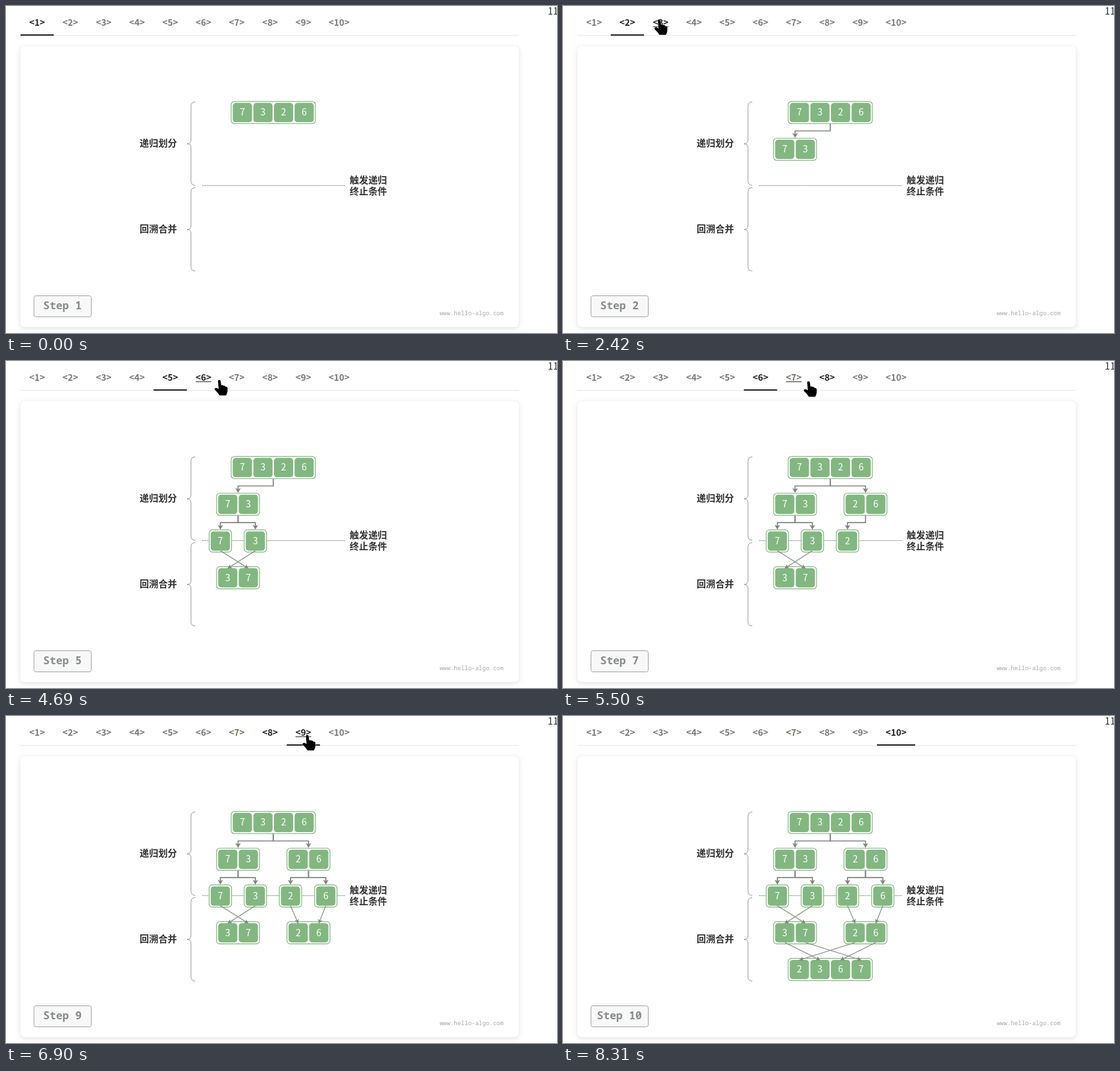
An HTML page for the animation above (9.11 s loop, 837x496 px).

```html
<!DOCTYPE html>
<html lang="zh-CN">
<head>
<meta charset="utf-8">
<title>归并排序</title>
<style>
  html, body { margin: 0; width: 100%; height: 100%; overflow: hidden; background: #fff; }
  svg { display: block; width: 837px; height: 496px; }
  text { font-family: "Noto Sans CJK SC", "Noto Sans CJK", "Noto Sans", sans-serif; }
  .card { fill: #fff; filter: drop-shadow(0 2px 4px rgba(0,0,0,.1)) drop-shadow(0 0 .6px rgba(0,0,0,.22)); }
  .tab { font-size: 13.5px; font-weight: 700; fill: #787878; text-anchor: middle; }
  .tab.olive { fill: #77745c; }
  .tab.dark { fill: #222; }
  .label { font-size: 14.2px; font-weight: 700; fill: #333; }
  .brace { fill: none; stroke: #999; }
  .dots { stroke: #666; stroke-dasharray: 1.2 1.2; }
  .box { fill: #fff; stroke: #83b781; stroke-width: 1.2; }
  .cell { fill: #83b781; }
  .num { font-size: 14px; fill: #fff; text-anchor: middle; }
  .elbow { fill: none; stroke: #838683; stroke-width: 1.7; }
  .merge { stroke: #7d8c7d; stroke-width: 1.1; }
  .head { fill: #7f857f; }
  .mono { font-family: "Noto Sans Mono", "DejaVu Sans Mono", monospace; }
  .step { font-size: 16.3px; font-weight: 700; fill: #868c88; text-anchor: middle; }
  .site { font-size: 9px; fill: #aaa; }
  .pointer { fill: #000; stroke: #fff; stroke-width: .8; paint-order: stroke; }
  .click { fill: #fff75c; mix-blend-mode: multiply; }
</style>
</head>
<body>
<svg id="stage" viewBox="0 0 837 496"></svg>
<script>
const LOOP = 9110, START = 140, TICK = 66.96, EXIT = 8305;
const stage = document.getElementById('stage');

function add(parent, tag, attrs, text) {
  const el = document.createElementNS('http://www.w3.org/2000/svg', tag);
  for (const key in attrs) el.setAttribute(key, attrs[key]);
  if (text) el.textContent = text;
  parent.append(el);
  return el;
}
const show = (el, on) => { el.style.display = on ? '' : 'none'; };
const clamp = v => Math.max(0, Math.min(1, v));

// Tabs
const TAB_W = 50.55, LAST_W = 58;
const tabLeft = i => 22 + TAB_W * i;
const tabWidth = i => i === 9 ? LAST_W : TAB_W;
add(stage, 'path', { d: 'M22 44.5H779', stroke: '#e9e9e9' });
const tabs = [...Array(10).keys()].map(i => add(stage, 'text', {
  class: 'tab', x: tabLeft(i) + tabWidth(i) / 2, y: 29.6
}, `<${i + 1}>`));
const underline = add(stage, 'rect', { y: 31, height: 1, fill: '#333' });
const bar = add(stage, 'rect', { y: 43, height: 2, fill: '#222' });
add(stage, 'text', { x: 823, y: 13, 'font-size': 14.5, fill: '#333' }, '11');

// Card
add(stage, 'rect', { class: 'card', x: 22, y: 61, width: 757, height: 426, rx: 5 });
for (const y of [145.5, 275.5]) {
  add(stage, 'path', { class: 'brace', d: `M287.5 ${y}q-6.5 0-6.5 6.5v51q0 6-6 6q6 0 6 6v50.5q0 6.5 6.5 6.5` });
}
for (const [x, y, text] of [
  [203, 212.5, '递归划分'], [203, 342.5, '回溯合并'],
  [522, 269.3, '触发递归'], [522, 286.3, '终止条件']
]) add(stage, 'text', { class: 'label', x, y }, text);
add(stage, 'path', { class: 'dots', d: 'M298 272.5H515' });
add(stage, 'rect', { x: 42.5, y: 439.5, width: 87, height: 32, rx: 3, fill: '#f8f8f8', stroke: '#a3a7a4' });
const stepText = add(stage, 'text', { class: 'mono step', x: 85.7, y: 460 });
add(stage, 'text', { class: 'mono site', x: 658.7, y: 469 }, 'www.hello-algo.com');

// Diagram: each step adds one layer
const PITCH = 31.3, ROW = 55.7, TOP = 144.8;
const rowY = r => TOP + ROW * r;
const cellX = (cx, n, i) => cx + (i - (n - 1) / 2) * PITCH;
const lines = add(stage, 'g'), boxes = add(stage, 'g'), merges = add(stage, 'g');
const layers = [...Array(10)].map(() => [lines, boxes, merges].map(g => add(g, 'g')));

function group(step, cx, row, digits) {
  const g = layers[step - 1][1], n = digits.length, y = rowY(row);
  const w = 34 + PITCH * (n - 1);
  add(g, 'rect', { class: 'box', x: cx - w / 2, y, width: w, height: 33.7, rx: 5 });
  [...digits].forEach((d, i) => {
    const x = cellX(cx, n, i);
    add(g, 'rect', { class: 'cell', x: x - 14.6, y: y + 2.3, width: 29.2, height: 29.2, rx: 4.5 });
    add(g, 'text', { class: 'num', x, y: y + 21.6 }, d);
  });
}
function head(g, x, y, angle, size) {
  add(g, 'path', {
    class: 'head', d: `M0 0L${-size * 1.7} ${-size}L${-size * 1.3} 0L${-size * 1.7} ${size}Z`,
    transform: `translate(${x} ${y}) rotate(${angle})`
  });
}
function elbow(step, from, to, row) {
  const g = layers[step - 1][0], y = rowY(row);
  add(g, 'path', { class: 'elbow', d: `M${from} ${y + 34}V${y + 44.7}H${to}V${y + 51}` });
  head(g, to, y + 55.2, 90, 4.2);
}
function merge(step, x1, x2, row) {
  const g = layers[step - 1][2], y1 = rowY(row) + 31.5, y2 = rowY(row + 1) + 2.6;
  add(g, 'line', { class: 'merge', x1, y1, x2, y2 });
  head(g, x2, y2, Math.atan2(y2 - y1, x2 - x1) * 180 / Math.PI, 3.6);
}

const MID = 406, L = 352.5, R = 459.5, LEAVES = [325.6, 378.8, 432.2, 485.8];
group(1, MID, 0, '7326');
group(2, L, 1, '73');  elbow(2, MID, L, 0);
group(6, R, 1, '26');  elbow(6, MID, R, 0);
[[3, L, '7'], [4, L, '3'], [7, R, '2'], [8, R, '6']].forEach(([step, parent, digit], i) => {
  group(step, LEAVES[i], 2, digit);
  elbow(step, parent, LEAVES[i], 1);
});
group(5, L, 3, '37');
merge(5, LEAVES[0], cellX(L, 2, 1), 2);
merge(5, LEAVES[1], cellX(L, 2, 0), 2);
group(9, R, 3, '26');
merge(9, LEAVES[2], cellX(R, 2, 0), 2);
merge(9, LEAVES[3], cellX(R, 2, 1), 2);
group(10, MID, 4, '2367');
[[L, 0, 1], [L, 1, 3], [R, 0, 0], [R, 1, 2]].forEach(([cx, i, to]) =>
  merge(10, cellX(cx, 2, i), cellX(MID, 4, to), 3));

// Pointer
const click = add(stage, 'circle', { class: 'click', r: 12.3 });
const hand = add(stage, 'path', {
  class: 'pointer',
  d: 'M-2 1Q0-1.5 2 1L3 8Q5 6.8 6.5 8.5Q8.5 7.8 9.5 10Q12.3 9.6 12.5 12V17Q12 20 10.3 23.3H.5Q-2 19-7 14.5Q-7.5 11.3-4 11.8L-1 13.5Z'
});
const arrow = add(stage, 'path', { class: 'pointer', d: 'M0 0V15L3.6 11.8L6 17.3L8.4 16.2L6 10.9H10.8Z' });

// time, x, y of the pointer tip
const PATH = [
  [140, 782, 480], [207, 618, 415], [274, 402, 278], [341, 250, 221], [408, 123, 177],
  [475, 68, 131], [542, 53, 101], [609, 59, 79], [800, 80, 38], [1010, 91, 17],
  [1350, 91, 16], [1560, 92, 17], [1950, 143, 20], [2080, 146, 20], [2700, 146, 21],
  [3240, 205, 26], [3500, 206, 26], [3900, 255, 28], [4200, 257, 29], [4550, 318, 29],
  [4690, 324, 29], [4860, 324, 30], [5250, 366, 31], [5500, 373, 31], [5850, 404, 30],
  [6150, 406, 30], [6480, 454, 29], [6900, 457, 29], [7100, 494, 23], [7440, 506, 28],
  [7780, 506, 28], [7850, 480, 68], [8040, 551, 166], [8220, 551, 166], [8235, 609, 182]
];
const CLICKS = [1420, 2440, 3340, 4050, 4750, 5360, 5980, 6580, 7630];

function pointerAt(t) {
  const i = PATH.findIndex(p => p[0] > t);
  if (i < 0) return PATH[PATH.length - 1].slice(1);
  if (i === 0) return PATH[0].slice(1);
  const [t0, x0, y0] = PATH[i - 1], [t1, x1, y1] = PATH[i];
  const k = (t - t0) / (t1 - t0);
  return [x0 + (x1 - x0) * k, y0 + (y1 - y0) * k];
}
const passed = (t, delay) => CLICKS.filter(c => t >= c + delay).length;

function draw(now) {
  const t = now < START ? 0 : START + Math.floor((now - START + 5) / TICK) * TICK;
  const [x, y] = pointerAt(t);
  const visible = now >= START && now < EXIT;
  const hover = visible && y < 46 ? tabs.findIndex((_, i) => x >= tabLeft(i) && x < tabLeft(i) + tabWidth(i)) : -1;

  const step = passed(t, 90) + 1;
  stepText.textContent = 'Step ' + step;
  layers.forEach((parts, i) => parts.forEach(g => show(g, i < step)));

  const active = passed(t, 150);
  const prev = Math.max(0, active - 1);
  const p = active ? clamp((t - CLICKS[active - 1] - 150) / 140) : 1;
  const ease = 1 - (1 - p) ** 2;
  bar.setAttribute('x', tabLeft(prev + (active - prev) * ease));
  bar.setAttribute('width', tabWidth(prev) + (tabWidth(active) - tabWidth(prev)) * ease);

  const olive = t > 5400;
  tabs.forEach((tab, i) => {
    const lingering = i === 7 && t > 5450 && t < 7600;
    const dark = i === active || lingering || (i === hover && !(i === 6 && olive));
    tab.classList.toggle('dark', dark);
    tab.classList.toggle('olive', i === 6 && olive);
  });
  show(underline, hover >= 0);
  if (hover >= 0) {
    const w = hover === 9 ? 31.6 : 23.8;
    underline.setAttribute('x', tabLeft(hover) + (tabWidth(hover) - w) / 2);
    underline.setAttribute('width', w);
  }

  show(hand, hover >= 0);
  show(arrow, visible && hover < 0);
  for (const el of [hand, arrow]) el.setAttribute('transform', `translate(${x} ${y})`);
  show(click, CLICKS.some(c => t >= c && t < c + 100));
  click.setAttribute('cx', x - 1);
  click.setAttribute('cy', y - .5);
}

const origin = performance.now();
function frame() {
  draw((performance.now() - origin) % LOOP);
  requestAnimationFrame(frame);
}
frame();
</script>
</body>
</html>
```
